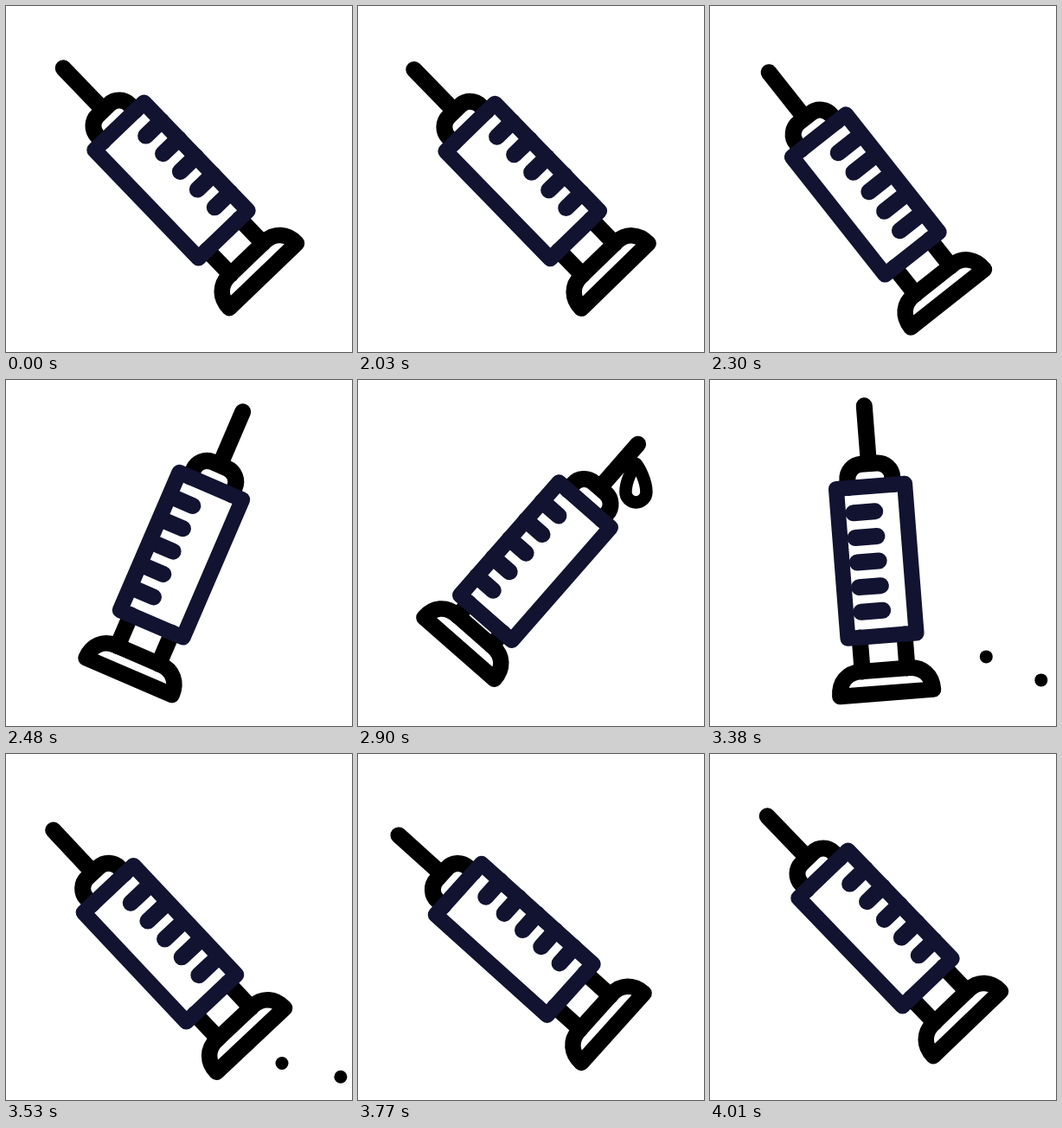
An HTML page with a canvas for the animation above (4040 ms loop, 400 by 400 pixels).

```html
<!DOCTYPE html>
<html lang="en">
<head>
<meta charset="utf-8">
<title>Syringe</title>
<style>
html, body { margin: 0; width: 100%; height: 100%; overflow: hidden; background: #fff; }
canvas { display: block; width: 100vmin; height: 100vmin; }
</style>
</head>
<body>
<canvas id="stage" width="400" height="400"></canvas>
<script>
const ctx = document.getElementById('stage').getContext('2d');
const LOOP = 4040, HOLD = 2030, STEP = 30;
const BLACK = '#000', NAVY = '#121331';

const REST = { x: 191, y: 201.5, angle: -43.9 };
const WOUND = { x: 175.4, y: 221, angle: -50.1 };
const AIM = { x: 210, y: 197, angle: 43.5 };
const RECOIL = { x: 205, y: 209.7, angle: 41.2 };

const clamp = v => Math.min(1, Math.max(0, v));
const ease = v => (1 - Math.cos(Math.PI * clamp(v))) / 2;
const mix = (a, b, p) => a + (b - a) * p;

// Rises from 0 to 1 over a..b and falls back over c..d
const pulse = (k, a, b, c, d) => ease((k - a) / (b - a)) - ease((k - c) / (d - c));

function blend(a, b, p) {
  return { x: mix(a.x, b.x, p), y: mix(a.y, b.y, p), angle: mix(a.angle, b.angle, p) };
}

function stroke(color, d, width) {
  ctx.strokeStyle = color;
  ctx.lineWidth = width;
  ctx.stroke(new Path2D(d));
}

function syringe(k) {
  const wind = pulse(k, -1, 6, 52.75, 66);
  const swing = pulse(k, 6, 19, 37, 52.75);
  const push = pulse(k, 19, 28, 30, 37);
  const tick = 27 - 54 * pulse(k, 6, 17, 40, 53);
  const pose = blend(blend(REST, WOUND, wind), blend(AIM, RECOIL, push), swing);
  const base = 153 - 19.5 * push, top = base - 27;

  ctx.save();
  ctx.translate(pose.x, pose.y);
  ctx.rotate(pose.angle * Math.PI / 180);

  // needle and hub
  stroke(BLACK, 'M0-180V-113M-26-87V-96A17 17 0 0 1-9-113H9A17 17 0 0 1 26-96V-87', 19);
  // plunger
  stroke(BLACK, `M-26 87V${top}M26 87V${top}`, 19);
  stroke(BLACK, `M-54 ${base}H54C54 ${base - 16} 44 ${top} 28 ${top}H-28C-44 ${top}-54 ${base - 16}-54 ${base}Z`, 18.5);
  // scale marks and barrel
  for (let i = -2; i <= 2; i++) stroke(NAVY, `M${tick - 12.5} ${i * 28.7}h25`, 19);
  stroke(NAVY, 'M-39.7-86.7H39.7V86.7H-39.7Z', 18);
  ctx.restore();
}

function drop(k) {
  if (k < 22 || k > 37) return;
  const size = ease((k - 21) / 6);
  const fall = 4.1 * Math.max(0, k - 27) ** 2;
  ctx.save();
  ctx.translate(321.4, 80.5 + fall);
  ctx.scale(size, size);
  stroke(BLACK, 'M0 0C-4 5-12 20-12 32.5A12 12 0 0 0 12 32.5C12 20 4 5 0 0Z', 14.5);
  ctx.restore();
}

function splash(k) {
  const u = (k - 36) / 17;
  if (u <= 0 || u >= 1) return;
  const out = 1 - (1 - u) ** 3.6, up = 4 * u * (1 - u);
  const dot = (reach, height) => {
    ctx.beginPath();
    ctx.arc(324 + reach * out, 410 - height * up, 7.5, 0, 2 * Math.PI);
    ctx.fill();
  };
  ctx.fillStyle = BLACK;
  dot(-5, 90.4);
  dot(63, 63.3);
}

function draw(now) {
  const t = now % LOOP;
  const k = Math.max(-1, Math.floor((t - HOLD) / STEP + 0.001));
  ctx.fillStyle = '#fff';
  ctx.fillRect(0, 0, 400, 400);
  ctx.lineCap = ctx.lineJoin = 'round';
  syringe(k);
  drop(k);
  splash(k);
}

let start;
function loop(now) {
  start ??= now;
  draw(now - start);
  requestAnimationFrame(loop);
}
draw(0);
requestAnimationFrame(loop);
</script>
</body>
</html>
```
